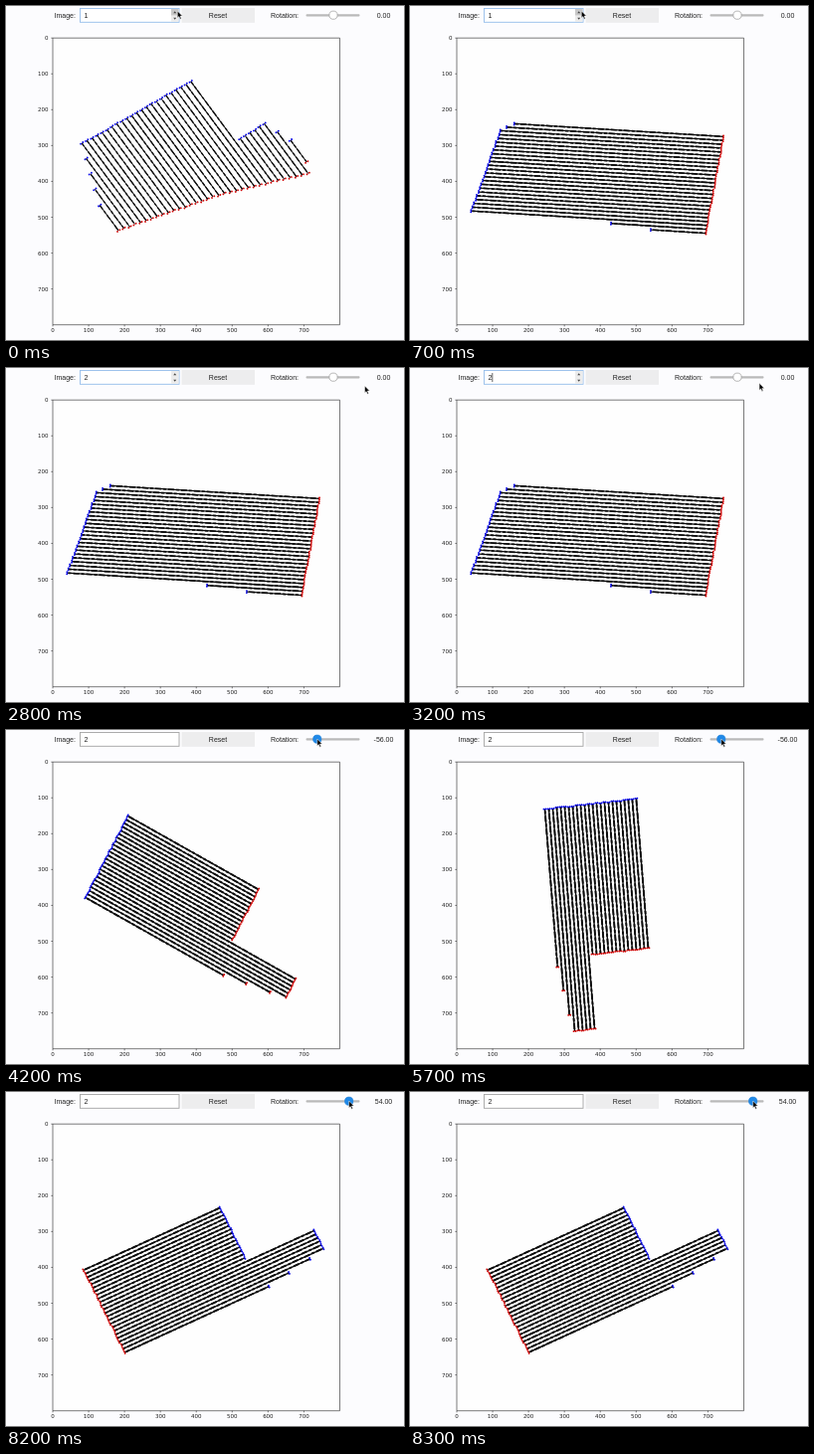
Recreate the animation shown at these times as an HTML page. Size 400 px wide and 336 px high, loop 9.9 s.

```html
<!DOCTYPE html>
<html lang="en">
<head>
<meta charset="utf-8">
<title>Field rows</title>
<style>
  html, body { margin: 0; width: 100%; height: 100%; overflow: hidden; background: #fcfcfe; }
  svg { display: block; width: 400px; height: 336px; }
  .ui { font: 7px "Liberation Sans", Arial, sans-serif; fill: #222; }
  .tick { font: 5.5px "DejaVu Sans", sans-serif; fill: #222; }
  .mid { text-anchor: middle; }
  .right { text-anchor: end; }
  .axis { fill: none; stroke: #222; stroke-width: .6; }
  .row { stroke: #0c0c0c; }
  .grain { stroke: #0c0c0c; stroke-dasharray: 6 2 3 2; }
  .dots { stroke-width: 1.9; stroke-linecap: round; }
</style>
</head>
<body>
<svg id="stage" viewBox="0 0 400 336">
  <rect width="400" height="336" fill="#fcfcfe"/>
  <text class="ui" x="48.5" y="11.8">Image:</text>
  <rect id="field" x="74.5" y="2.5" width="99.5" height="13.8" fill="#fff" stroke-width=".9"/>
  <text id="number" class="ui" x="78.6" y="11.8"></text>
  <path id="caret" d="M82.8 5V14" stroke="#222" stroke-width=".7"/>
  <g id="spinner">
    <rect x="166" y="3" width="7.4" height="12.8" fill="#ececec"/>
    <rect id="spinUp" x="166" y="3" width="7.4" height="6.4"/>
    <path d="M168.2 7.2l1.5-2 1.5 2zM168.2 11.8l1.5 2 1.5-2z" fill="#444"/>
  </g>
  <rect x="176.5" y="2" width="73.5" height="14.8" fill="#ededee"/>
  <text class="ui mid" x="213" y="11.8">Reset</text>
  <text class="ui" x="266" y="11.8">Rotation:</text>
  <rect x="301.5" y="8.2" width="54" height="2.2" rx="1" fill="#b9b9b9"/>
  <circle id="thumb" cy="9.2" r="4.1" stroke-width=".7"/>
  <text id="angle" class="ui mid" x="379.5" y="11.8"></text>
  <rect x="47" y="32.2" width="288.5" height="288.5" fill="#fefefe"/>
  <g id="plots"></g>
  <g id="axes"></g>
  <path id="cursor" d="M0 0V7L1.6 5.6 2.7 8.2 3.9 7.7 2.8 5.1H5Z" fill="#000" stroke="#fff" stroke-width=".5"/>
</svg>
<script>
const LOOP = 9900, STEP = 100;
const AX = 47, AY = 32.2, SIZE = 288.5, UNIT = SIZE / 800;
const BLUE = '#0808e8', RED = '#d40c0c';
const $ = id => document.getElementById(id);
const mix = (a, b, k) => a + (b - a) * k;
const glide = (t, from, to) => Math.min(1, Math.max(0, (t - from) / (to - from)));

function add(parent, tag, attrs, text) {
  const el = document.createElementNS('http://www.w3.org/2000/svg', tag);
  for (const key in attrs) el.setAttribute(key, attrs[key]);
  if (text !== undefined) el.textContent = text;
  parent.appendChild(el);
  return el;
}

function seeded(seed) {
  return () => (seed = (seed * 16807) % 2147483647) / 2147483647;
}

// Outlines lie around the plot centre, before the tilt; parallel rows fill them.
const fields = [
  { tilt: 53.5, rows: 35, weight: 1.3,
    outline: [[-84, -56.5], [-9, -56.5], [-6, -90], [24, -101], [50, -101], [61, -96],
              [26, -14], [-7, 92.5], [-38, 92.5], [-99, 70]] },
  { tilt: 3.5, rows: 26, weight: 1.7,
    outline: [[-89, -52.8], [121, -52.8], [109, 45.7], [56, 45.7], [7, 41], [-128, 39], [-103, -46]] },
  { tilt: 29.4, rows: 24, weight: 1.9,
    outline: [[-104, -44.8], [47, -44.8], [48.5, 14], [123.5, 14], [124, 37], [57, 48], [-101, 48]] }
];

// First and last crossing of the outline with a horizontal line.
function crossings(outline, y) {
  const xs = [];
  outline.forEach(([ax, ay], i) => {
    const [bx, by] = outline[(i + 1) % outline.length];
    if ((ay > y) !== (by > y)) xs.push(mix(ax, bx, (y - ay) / (by - ay)));
  });
  return [Math.min(...xs), Math.max(...xs)];
}

function buildField({ tilt, rows, weight, outline }, index) {
  const random = seeded(4177 + index * 911);
  const group = add($('plots'), 'g', { fill: 'none' });
  const ys = outline.map(point => point[1]);
  const top = Math.min(...ys) + .2, bottom = Math.max(...ys) - .2;
  const pitch = (bottom - top) / (rows - 1);
  const dots = ['', ''];
  for (let i = 0; i < rows; i++) {
    const y = top + i * pitch;
    const ends = crossings(outline, y).map(x => x + random() - .5);
    const d = `M${ends[0]} ${y}H${ends[1]}`;
    add(group, 'path', { class: 'row', d, 'stroke-width': weight * .75 });
    add(group, 'path', { class: 'grain', d, 'stroke-width': weight, 'stroke-dashoffset': random() * 13 });
    ends.forEach((x, k) => {
      dots[k] += `M${x} ${y - pitch / 4}h.01M${x} ${y + pitch / 4}h.01`;
    });
  }
  const marks = dots.map(d => add(group, 'path', { class: 'dots', d }));
  return { group, marks, tilt };
}

function buildAxes() {
  const axes = $('axes');
  let d = `M${AX} ${AY}h${SIZE}v${SIZE}h${-SIZE}z`;
  for (let n = 0; n < 800; n += 100) {
    const x = AX + n * UNIT, y = AY + n * UNIT;
    d += `M${x} ${AY + SIZE}v1.6M${AX} ${y}h-1.6`;
    add(axes, 'text', { class: 'tick mid', x, y: 328.4 }, n);
    add(axes, 'text', { class: 'tick right', x: 42.6, y: y + 2 }, n);
  }
  add(axes, 'path', { class: 'axis', d });
}

const thumbX = value => 329 + value * .29;

// From the spinner into the plot, back in an arc, then onto the slider.
function pointer(t, value) {
  const out = glide(t, 900, 1400), back = glide(t, 1900, 2800), reach = glide(t, 2900, 3900);
  const x = mix(mix(172.3, 308, out), 360.5, back) + 55 * Math.sin(Math.PI * back);
  const y = mix(mix(5, 178, out), 18, back * back);
  return [mix(x, thumbX(value), reach), mix(y, 9, reach)];
}

buildAxes();
const plots = fields.map(buildField);

function draw(time) {
  const t = Math.floor(time / STEP) * STEP;
  const focused = t < 4000;
  const value = Math.round(-56 * glide(t, 3900, 4200) + 110 * glide(t, 6200, 6900));
  const shown = t < 700 ? 0 : t < 3400 ? 1 : 2;
  const rotation = t < 5700 ? 0 : t < 8200 ? -56 : 54;
  const caretOn = focused && t >= 100 && Math.floor(Math.max(0, t - 200) / 500) % 2 === 0;

  $('field').setAttribute('stroke', focused ? '#94bdea' : '#a4a4a4');
  $('number').textContent = t < 1000 ? 1 : 2;
  $('caret').style.display = caretOn ? '' : 'none';
  $('spinner').style.display = focused ? '' : 'none';
  $('spinUp').setAttribute('fill', t < 1100 ? '#c8c8c8' : '#ececec');

  $('thumb').setAttribute('cx', thumbX(value));
  $('thumb').setAttribute('fill', focused ? '#fff' : '#2089e8');
  $('thumb').setAttribute('stroke', focused ? '#9a9a9a' : '#1c7fd8');
  $('angle').textContent = value.toFixed(2);
  $('cursor').setAttribute('transform', `translate(${pointer(t, value)})`);

  plots.forEach(({ group, marks, tilt }, i) => {
    const turn = tilt - rotation;
    group.style.display = i === shown ? '' : 'none';
    group.setAttribute('transform', `translate(${AX + SIZE / 2} ${AY + SIZE / 2}) rotate(${turn})`);
    // The upper end of each row is blue.
    const colors = turn < 0 ? [RED, BLUE] : [BLUE, RED];
    marks.forEach((mark, k) => mark.setAttribute('stroke', colors[k]));
  });
}

const began = performance.now();
function tick() {
  draw((performance.now() - began) % LOOP);
  requestAnimationFrame(tick);
}
tick();
</script>
</body>
</html>
```
